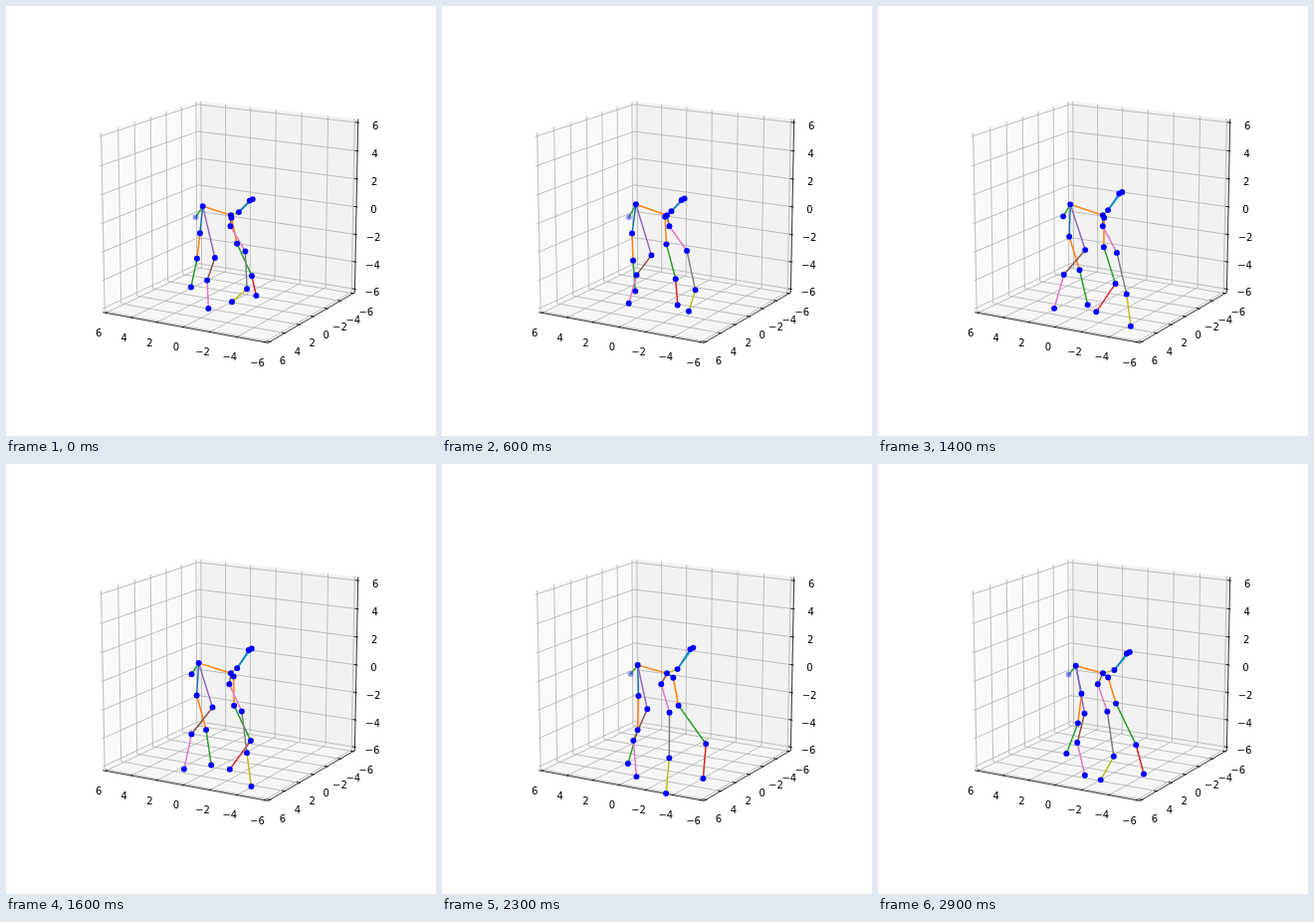
Animation of 432x432 px, one loop 3 s. Source, as an HTML page:

```html
<!DOCTYPE html>
<html lang="en">
<head>
<meta charset="utf-8">
<title>Walking skeleton</title>
<style>
  html, body { margin: 0; width: 100%; height: 100%; overflow: hidden; background: #fff; }
  svg { display: block; width: 100%; height: 100%; }
  text { font: 10px "DejaVu Sans", sans-serif; text-anchor: middle; }
  .grid { stroke: #b0b0b0; stroke-width: .8; fill: none; }
  .axis { stroke: #000; stroke-width: .8; }
  .bone { stroke-width: 1.5; stroke-linecap: square; }
  .joint { fill: #00f; }
</style>
</head>
<body>
<svg viewBox="0 0 432 432"><g id="axes"></g><g id="bones"></g><g id="joints"></g></svg>
<script>
const LOOP = 3000, STEP = 100, STRIDE = 3600;
const layer = id => document.getElementById(id);
const axes = layer('axes'), bones = layer('bones'), joints = layer('joints');

function add(parent, tag, attrs, text) {
  const el = document.createElementNS('http://www.w3.org/2000/svg', tag);
  for (const k in attrs) el.setAttribute(k, attrs[k]);
  if (text) el.textContent = text;
  return parent.appendChild(el);
}

// Perspective view of the plot cube: azimuth 120°, elevation 15°
const AZ = 2 * Math.PI / 3, EL = Math.PI / 12, E = 6.25;
function project(x, y, z) {
  const X = x * 1.012 / 12, Y = y / 12, Z = z / 12;
  const side = Math.cos(AZ) * Y - Math.sin(AZ) * X;
  const near = Math.cos(AZ) * X + Math.sin(AZ) * Y;
  const up = Z * Math.cos(EL) - near * Math.sin(EL);
  const depth = 1 - (near * Math.cos(EL) + Z * Math.sin(EL)) / 10;
  return [226 + 179 * side / depth, 210.2 - 176 * up / depth];
}
const outline = pts => pts.map(p => project(...p).join()).join(' ');
const path = (cls, ...pts) => add(axes, 'polyline', { class: cls, points: outline(pts) });
const pane = (fill, ...pts) => add(axes, 'polygon', { fill, points: outline(pts) });
function label(value, pt, dx, dy) {
  const [x, y] = project(...pt);
  add(axes, 'text', { x: x + dx, y: y + dy + 3.6 }, String(value).replace('-', '\u2212'));
}

function drawAxes() {
  pane('#f9f9f9', [E, E, -E], [E, -E, -E], [E, -E, E], [E, E, E]);
  pane('#f2f2f2', [E, -E, -E], [-E, -E, -E], [-E, -E, E], [E, -E, E]);
  pane('#f6f6f6', [E, E, -E], [E, -E, -E], [-E, -E, -E], [-E, E, -E]);
  for (let v = -6; v <= 6; v += 2) {
    path('grid', [v, E, -E], [v, -E, -E], [v, -E, E]);
    path('grid', [-E, v, -E], [E, v, -E], [E, v, E]);
    path('grid', [E, E, v], [E, -E, v], [-E, -E, v]);
  }
  path('axis', [E, E, -E], [-E, E, -E]);
  path('axis', [-E, E, -E], [-E, -E, -E]);
  path('axis', [-E, -E, -E], [-E, -E, E]);
  for (let v = -6; v <= 6; v += 2) {
    path('axis', [v, E + .1, -E], [v, E - .2, -E]);
    path('axis', [-E - .1, v, -E], [.2 - E, v, -E]);
    path('axis', [-E - .1, -E, v], [.2 - E, -E, v]);
    label(v, [v, E, -E], -7.1, 20.2);
    label(v, [-E, v, -E], 13, 18.7);
    label(v, [-E, -E, v], 17.5, 3);
  }
}

// Gait cycle: a mean plus cosine and sine parts of the first and second harmonic
function wave(phase, [mean, c1 = 0, s1 = 0, c2 = 0, s2 = 0]) {
  return mean + c1 * Math.cos(phase) + s1 * Math.sin(phase)
              + c2 * Math.cos(2 * phase) + s2 * Math.sin(2 * phase);
}

const nodes = [], links = [];
function node(parent, dx, dy) {
  const n = { parent, dx, dy, el: add(joints, 'circle', { class: 'joint', r: 2.95 }) };
  nodes.push(n);
  return n;
}
function link(a, b, stroke) {
  links.push({ a, b, el: add(bones, 'line', { class: 'bone', stroke }) });
}
// A bone swings its end around the parent joint; returns the new joint
function bone(parent, stroke, dx, dy) {
  const end = node(parent, dx, dy);
  link(parent, end, stroke);
  return end;
}

const blue = '#1f77b4', orange = '#ff7f0e', green = '#2ca02c', red = '#d62728', purple = '#9467bd',
      brown = '#8c564b', pink = '#e377c2', gray = '#7f7f7f', olive = '#bcbd22', cyan = '#17becf';

drawAxes();

const chest = node(null, [226], [210.3]);
const hip = bone(chest, orange, [-30, 1.7, -2.3], [-9.5, .3, -1.9]);
const tail = bone(hip, green, [-7.1], [10.8, .3, 2.2]);

// Front legs
let j = bone(chest, blue, [2.3, -1.8, -3.8], [3, -.6, -1.4]);
j = bone(j, orange, [3.6, 2, -3.8], [27.6, -1.6, .9]);
j = bone(j, green, [16.7, -3.5, -8.2, 1.7, 2.7], [36.7, -1, -2.2, -3.2, -1.2]);
bone(j, red, [-3.2, 11.7, -5.9, -4.1, 2.7], [27.8, -5.2, -2.1, -2.9, 1.6]);

j = bone(chest, brown, [-1.8, 1.3, 4.1], [11]);
j = bone(j, pink, [12.9, 2, 4.3], [26.5, -1.3, -1.4]);
j = bone(j, gray, [5.3, .4, 4.1, -4, -2.9], [41.9, -2.2, -2.7, -1.9]);
bone(j, olive, [-5.8, -9.3, 4.4], [25.9, -11.2, -1, -1.8, 1.3]);

// Hind legs
j = bone(hip, blue, [-.4, -.1, -3.4, -2.3, -1.9], [29.8, -2.7, .8]);
j = bone(j, orange, [1.5, -5, 4.6, .5, -2], [30.4, -4.8, -.9]);
bone(j, green, [-2.6, -3.4, 9.6, 0, -2], [32.1, -3.4, .5]);

j = bone(hip, purple, [12.4, -.2, 3.8], [47.9, 4, 1.4]);
j = bone(j, brown, [-13.8, 6, -4.8], [25.7, -3.1, -5]);
bone(j, pink, [-1.7, 3, -8.8], [32.2, -3.9, -2]);

// Head
const neck = bone(chest, olive, [7.7, .2, -3.9], [-4.1, .9, -.6]);
const brow = node(neck, [11.5, -.6, -1.2], [-15.4, 3.9, 2.7]);
const nose = node(brow, [3], [-1.5]);
link(neck, nose, cyan);
link(neck, brow, blue);
link(brow, nose, blue);

function draw() {
  const t = Math.floor(performance.now() % LOOP / STEP) * STEP;
  const phase = 2 * Math.PI * t / STRIDE;
  for (const n of nodes) {
    n.x = wave(phase, n.dx) + (n.parent ? n.parent.x : 0);
    n.y = wave(phase, n.dy) + (n.parent ? n.parent.y : 0);
    n.el.setAttribute('cx', n.x);
    n.el.setAttribute('cy', n.y);
  }
  for (const { a, b, el } of links) {
    el.setAttribute('x1', a.x);
    el.setAttribute('y1', a.y);
    el.setAttribute('x2', b.x);
    el.setAttribute('y2', b.y);
  }
  // The tail tip fades while it points away from the viewer
  tail.el.setAttribute('opacity', t > 1200 && t < 2100 ? 1 : .38);
  requestAnimationFrame(draw);
}
draw();
</script>
</body>
</html>
```
